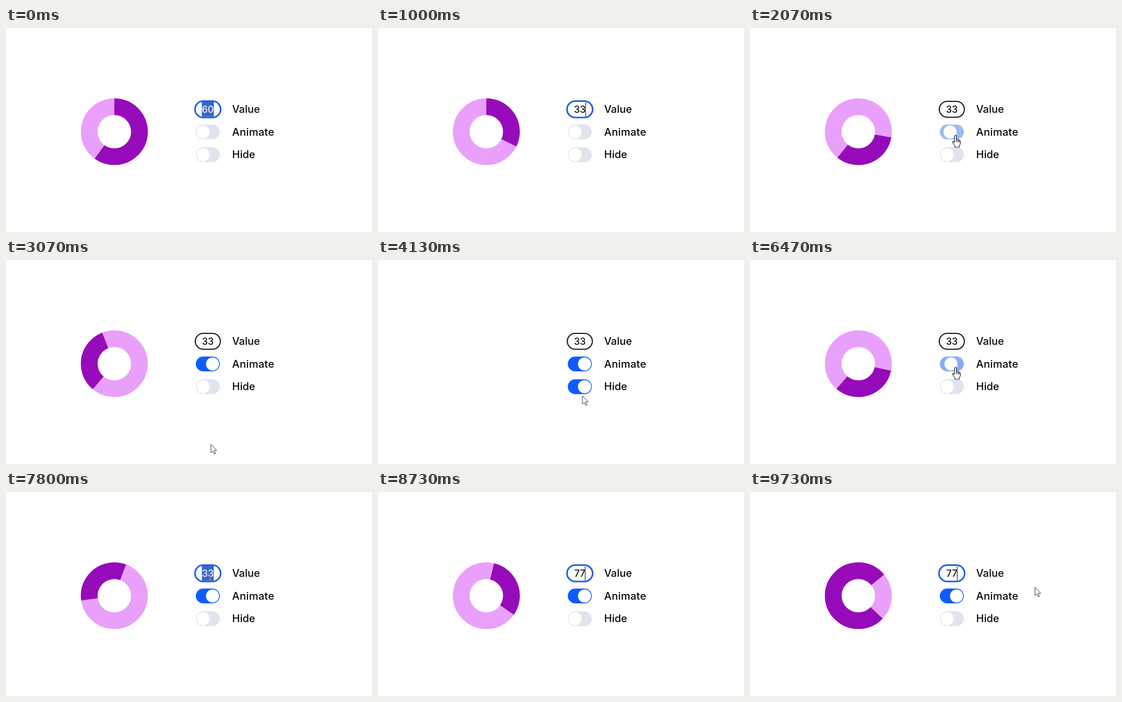
An HTML page for the animation above (9.79 s loop, 700 by 392 pixels).

```html
<!DOCTYPE html>
<html lang="en">
<head>
<meta charset="utf-8">
<title>Progress ring</title>
<style>
  html, body { margin: 0; width: 100%; height: 100%; overflow: hidden; background: #fff; }
  svg { display: block; width: 700px; height: 392px; }
  text { font: 500 20px Inter, "Noto Sans", sans-serif; fill: #080808; }
  #value { font-size: 18px; text-anchor: middle; }
  #ring circle { fill: none; stroke-width: 32; }
  #text { mix-blend-mode: difference; }
</style>
</head>
<body>
<svg viewBox="0 0 700 392">
  <g id="ring">
    <circle cx="207.2" cy="199.3" r="48" stroke="#e9a0fb"/>
    <circle id="arc" cx="207.2" cy="199.3" r="48" stroke="#960bb9" pathLength="100"/>
  </g>

  <rect id="box" fill="#fff"/>
  <rect id="selection" y="142" height="28.5" fill="#3b66c6"/>
  <text id="value" x="386" y="163"></text>
  <rect id="caret" y="143" width="1.2" height="27" fill="#222"/>

  <rect id="animateTrack" x="363" y="185.5" width="46" height="28.5" rx="14.25"/>
  <circle id="animateKnob" cy="199.8" r="12.6" fill="#fff"/>
  <rect id="hideTrack" x="363" y="229.2" width="46" height="28.5" rx="14.25"/>
  <circle id="hideKnob" cy="243.5" r="12.6" fill="#fff"/>

  <text x="432.5" y="163">Value</text>
  <text x="432.5" y="207" letter-spacing=".3">Animate</text>
  <text x="432.5" y="250">Hide</text>

  <path id="arrow" d="M0 0V16l3.7-3.5 2.6 6 2.4-1-2.6-5.8h5z" fill="#fff" stroke="#333"/>
  <g id="hand" fill="#fff" stroke="#222" stroke-width="1.2" stroke-linejoin="round">
    <path d="M-1.8 1.2a1.8 1.8 0 0 1 3.6 0V7.5l1.2-.5 2 1 1-.2 1.6 1h.8l.9 1.5V16l-2 3v3h-8.5v-2.5l-4-6c-1.5-2 .3-3.6 1.8-2.4L-1.8 13Z"/>
    <path d="M1.8 8v4M4.5 8.5v4M7 9v4" fill="none"/>
  </g>
  <path id="text" d="M-2.5-6h2l.5.5.5-.5h2M0-5.5v11M-2.5 6h2l.5-.5.5.5h2" fill="none" stroke="#fff"/>
</svg>
<script>
const LOOP = 9790;
const $ = id => document.getElementById(id);
const set = (id, attrs) => {
  for (const k in attrs) $(id).setAttribute(k, attrs[k]);
};
const show = (id, on) => set(id, { visibility: on ? 'visible' : 'hidden' });
const mix = (a, b, p) => a + (b - a) * p;

// [time, new state]
const typed = [[0, 60], [450, 3], [650, 33], [8440, 7], [8640, 77]];
const animate = [[0, 0], [1988, 1], [5800, 0], [6370, 1]];
const hide = [[0, 0], [3690, 1], [4700, 0]];
const BLUR = 1985, FOCUS = 7450;

// [time, x, y] of the pointer
const pointer = [
  [1350, 404, 392], [1800, 393, 207], [2450, 393, 207], [2900, 392, 356],
  [3150, 392, 354], [3550, 391, 247], [3800, 391, 247], [4050, 391, 261],
  [4170, 391, 261], [4320, 391, 246], [4850, 391, 246], [5150, 393, 207],
  [6800, 393, 207], [7250, 390, 163], [9350, 390, 163], [9620, 545, 183],
  [LOOP, 545, 183]
];

// CSS "ease": cubic-bezier(.25, .1, .25, 1)
function ease(x) {
  if (x >= 1) return 1;
  let lo = 0, hi = 1, s;
  for (let i = 0; i < 18; i++) {
    s = (lo + hi) / 2;
    if (.75 * s * (1 - s) + s ** 3 < x) lo = s; else hi = s;
  }
  return .3 * s * (1 - s) ** 2 + 3 * s * s * (1 - s) + s ** 3;
}

const last = (keys, t) => keys.filter(k => k[0] <= t).pop();

// Transition that restarts from its current value at each key
function tween(keys, t, length) {
  let v = keys[0][1];
  for (let i = 1; i < keys.length && t >= keys[i][0]; i++) {
    const end = i + 1 < keys.length ? Math.min(t, keys[i + 1][0]) : t;
    v = mix(v, keys[i][1], ease((end - keys[i][0]) / length));
  }
  return v;
}

function drawSwitch(name, p) {
  const off = [223, 228, 239], on = [13, 92, 255];
  set(name + 'Track', { fill: `rgb(${off.map((c, i) => Math.round(mix(c, on[i], p)))})` });
  set(name + 'Knob', { cx: mix(377, 395, p) });
}

function drawRing(t) {
  const [start, spinning] = last(animate, t);
  const angle = spinning ? (t - start) * .12 : -90;
  set('arc', {
    'stroke-dasharray': tween(typed, t, 500) + ' 100',
    transform: `rotate(${angle} 207.2 199.3)`
  });
  set('ring', { opacity: 1 - tween(hide, t, 400) });
}

function drawInput(t) {
  const focused = t < BLUR || t >= FOCUS;
  const [since, value] = last(typed, t);
  const selected = t < typed[1][0] || (t >= FOCUS && t < typed[3][0]);
  const label = $('value');
  label.textContent = value;
  label.style.fill = selected ? '#f2f4ff' : '#151515';
  const w = label.getComputedTextLength();
  set('box', focused
    ? { x: 361.5, y: 140.5, width: 49, height: 31.5, rx: 15.75, stroke: '#1a60ea', 'stroke-width': 3 }
    : { x: 362, y: 141, width: 48, height: 30.5, rx: 15.25, stroke: '#0c0c0c', 'stroke-width': 2 });
  set('selection', { x: 386 - w / 2, width: w });
  show('selection', selected);
  set('caret', { x: 386 + w / 2 - .8 });
  show('caret', focused && !selected && (t - since) % 1060 < 530);
}

function drawPointer(t) {
  const visible = t >= pointer[0][0] && (t < typed[3][0] || t > 9350);
  let kind = '';
  if (visible) {
    const i = Math.max(1, pointer.findIndex(k => k[0] > t));
    const [t0, x0, y0] = pointer[i - 1], [t1, x1, y1] = pointer[i];
    const u = (t - t0) / (t1 - t0), p = u * u * (3 - 2 * u);
    const x = mix(x0, x1, p), y = mix(y0, y1, p);
    const over = (top, bottom) => x > 361 && x < 411 && y > top && y < bottom;
    kind = over(140, 172) ? 'text' : over(185, 214) || over(229, 258) ? 'hand' : 'arrow';
    set(kind, { transform: `translate(${x} ${y})` });
  }
  for (const id of ['arrow', 'hand', 'text']) show(id, id === kind);
}

function frame() {
  const t = performance.now() % LOOP;
  drawRing(t);
  drawInput(t);
  drawSwitch('animate', tween(animate, t, 400));
  drawSwitch('hide', tween(hide, t, 400));
  drawPointer(t);
  requestAnimationFrame(frame);
}
frame();
</script>
</body>
</html>
```
